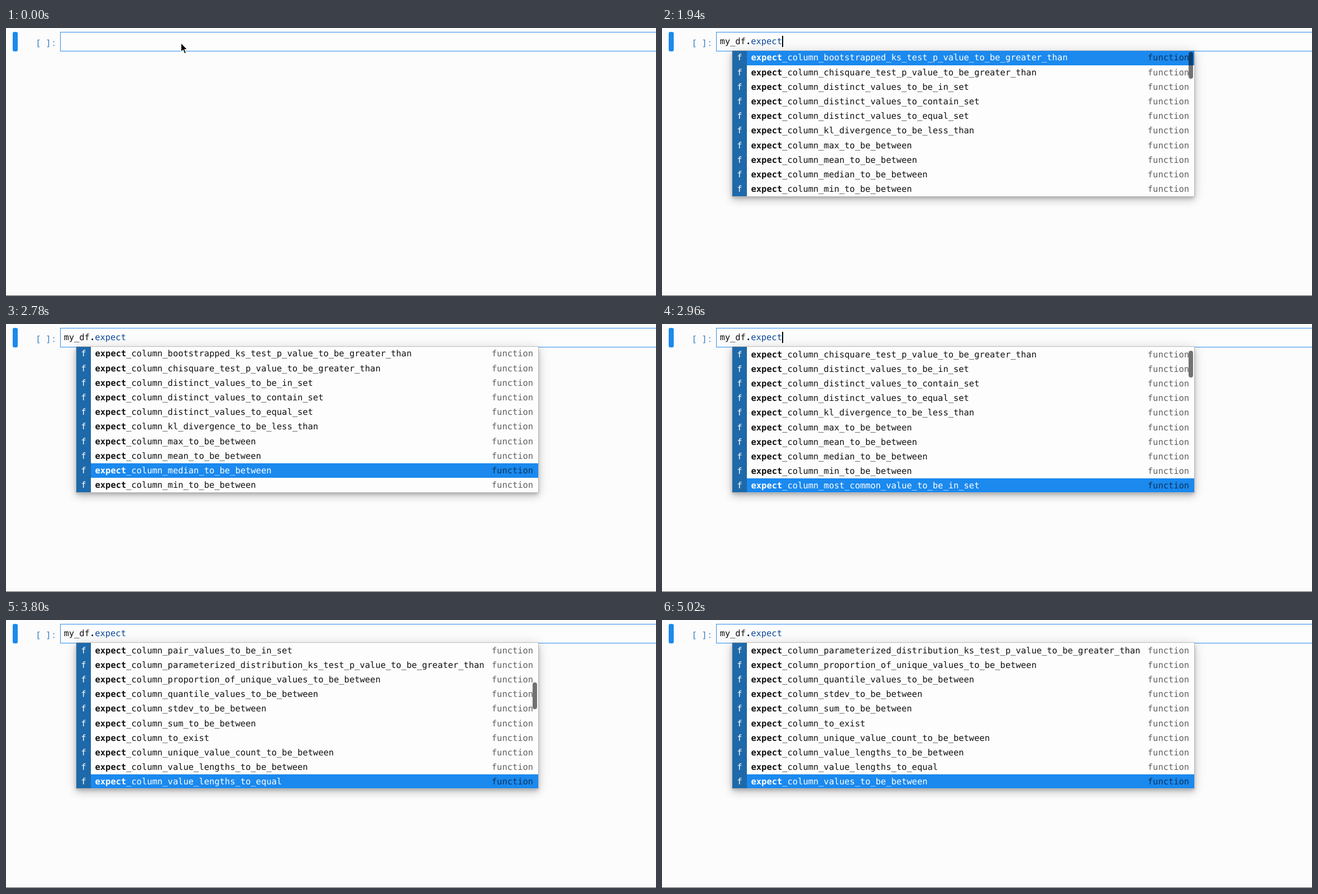
An HTML page that plays this animation: 1164 px wide and 481 px high, repeating every 5120 ms.

```html
<!DOCTYPE html>
<html lang="en">
<head>
<meta charset="utf-8">
<title>Notebook completion</title>
<style>
  html, body { margin: 0; width: 100%; height: 100%; overflow: hidden; background: #fcfcfc; }
  body {
    position: relative; color: #111; white-space: pre;
    font: 15.457px/26.2px "DejaVu Sans Mono", monospace;
    text-rendering: geometricPrecision; font-variant-ligatures: none;
  }
  body div, svg { position: absolute; }
  #bar { left: 12px; top: 7px; width: 9px; height: 35px; border-radius: 3px; background: #1b89ef; }
  #prompt { left: 53px; top: 13px; color: #3277ba; font-family: "Noto Sans Mono", monospace; font-size: 15.5px; font-weight: 500; }
  #cell { left: 97px; top: 7px; width: 1080px; height: 35px; box-sizing: border-box; border: 1.5px solid #2a8eec; background: #fdfdfd; }
  #code { left: 103.4px; top: 11px; }
  #code i { font-style: normal; color: #0a489f; }
  #caret { top: 14px; width: 1.3px; height: 20px; background: #000; }
  #foot { left: 0; top: 480px; width: 100%; height: 1px; background: #5c5c5c; }
  #popup {
    left: 125px; top: 40px; width: 829px; height: 263px; box-sizing: border-box;
    border: 1px solid #bdbdbd; background: #fdfdfd;
    box-shadow: 0 3.6px 6px -1.2px rgba(0,0,0,.2), 0 7px 12px rgba(0,0,0,.14), 0 1px 21px rgba(0,0,0,.12);
  }
  #clip { left: 0; top: 0; width: 100%; height: 100%; overflow: hidden; }
  #list { left: 0; top: 0; width: 100%; }
  .row { left: 0; width: 100%; height: 26.2px; }
  .row div { top: 0; height: 26.2px; }
  .kind { left: 0; width: 26px; background: #1e69a9; color: #fff; text-align: center; }
  .name { left: 33.5px; }
  .type { left: 743.8px; color: rgba(0,0,0,.62); }
  .on { background: #1b89ee; }
  .on .name { color: #fff; }
  #thumb { left: 817px; width: 8px; height: 48px; border-radius: 4px; background: rgba(0,0,0,.55); }
</style>
</head>
<body><div id="bar"></div><div id="prompt">[ ]:</div><div id="cell"></div><div id="code"></div><div id="caret"></div><div id="foot"></div><div id="popup"><div id="clip"><div id="list"></div><div id="thumb"></div></div></div><svg id="mouse" style="left:310px;top:24px" width="18" height="26" viewBox="0 0 18 26"><path d="M3.3 2.6V19.2L7.1 15.7L9.7 22L12.6 20.8L10 14.7H15.1Z" fill="#000" stroke="#fff" stroke-width="1.3"/></svg>
<script>
const LOOP = 5120, PITCH = 9.306, ROW = 26.2;
const TEXT = 'my_df.expect';
const KEYS = [580, 660, 740, 820, 900, 1000, 1120, 1200, 1300, 1400, 1500, 1660];
const OPEN = 1843, REPEAT_START = 2148, REPEAT = 75, LAST = 23, BLINK = 265;
const NAMES = `bootstrapped_ks_test_p_value_to_be_greater_than
chisquare_test_p_value_to_be_greater_than
distinct_values_to_be_in_set
distinct_values_to_contain_set
distinct_values_to_equal_set
kl_divergence_to_be_less_than
max_to_be_between
mean_to_be_between
median_to_be_between
min_to_be_between
most_common_value_to_be_in_set
pair_values_A_to_be_greater_than_B
pair_values_to_be_equal
pair_values_to_be_in_set
parameterized_distribution_ks_test_p_value_to_be_greater_than
proportion_of_unique_values_to_be_between
quantile_values_to_be_between
stdev_to_be_between
sum_to_be_between
to_exist
unique_value_count_to_be_between
value_lengths_to_be_between
value_lengths_to_equal
values_to_be_between`.split('\n');

const $ = id => document.getElementById(id);
const show = (id, on) => { $(id).style.visibility = on ? 'inherit' : 'hidden'; };

$('list').innerHTML = NAMES.map((name, i) =>
  `<div class="row" style="top:${i * ROW}px"><div class="kind">f</div>` +
  `<div class="name"><b>expect</b>_column_${name}</div><div class="type">function</div></div>`).join('');
const rows = [...$('list').children];

function snap(t) {
  if (t < 540) return Math.floor(t / 20) * 20;
  const u = (t - 540) % 560;
  return Math.min(5020, t - u + Math.min(460, Math.floor(u / 20) * 20));
}

function caretOn(t) {
  if (t < KEYS[0]) return t >= 140 && t < 400;
  return t < OPEN || Math.floor((t - OPEN) / BLINK) % 2 === 0;
}

function draw(t) {
  const typed = KEYS.filter(k => t >= k).length;
  const s = TEXT.slice(0, typed);
  $('code').innerHTML = s.slice(0, 5) + `<b>${s.slice(5, 6)}</b><i>${s.slice(6)}</i>`;
  $('caret').style.left = 103.8 + typed * PITCH + 'px';
  show('caret', caretOn(t));
  show('mouse', t < KEYS[0]);
  show('popup', t >= OPEN);

  const index = Math.max(0, Math.min(LAST, Math.floor((t - REPEAT_START) / REPEAT)));
  const scroll = Math.max(0, index - 9);
  rows.forEach((row, i) => row.classList.toggle('on', i === index));
  $('list').style.top = (scroll ? 0.6 - scroll * ROW : -0.6) + 'px';

  // Overlay scrollbar: shown on opening and while scrolling, then fades.
  const rest = t < 2898 ? t - OPEN : Math.max(0, t - 3873);
  $('thumb').style.top = 2 + scroll * 5.29 + 'px';
  $('thumb').style.opacity = Math.max(0, Math.min(1, (400 - rest) / 100));
}

const start = performance.now();
function tick() {
  draw(snap((performance.now() - start) % LOOP));
  requestAnimationFrame(tick);
}
tick();
</script>
</body>
</html>
```
